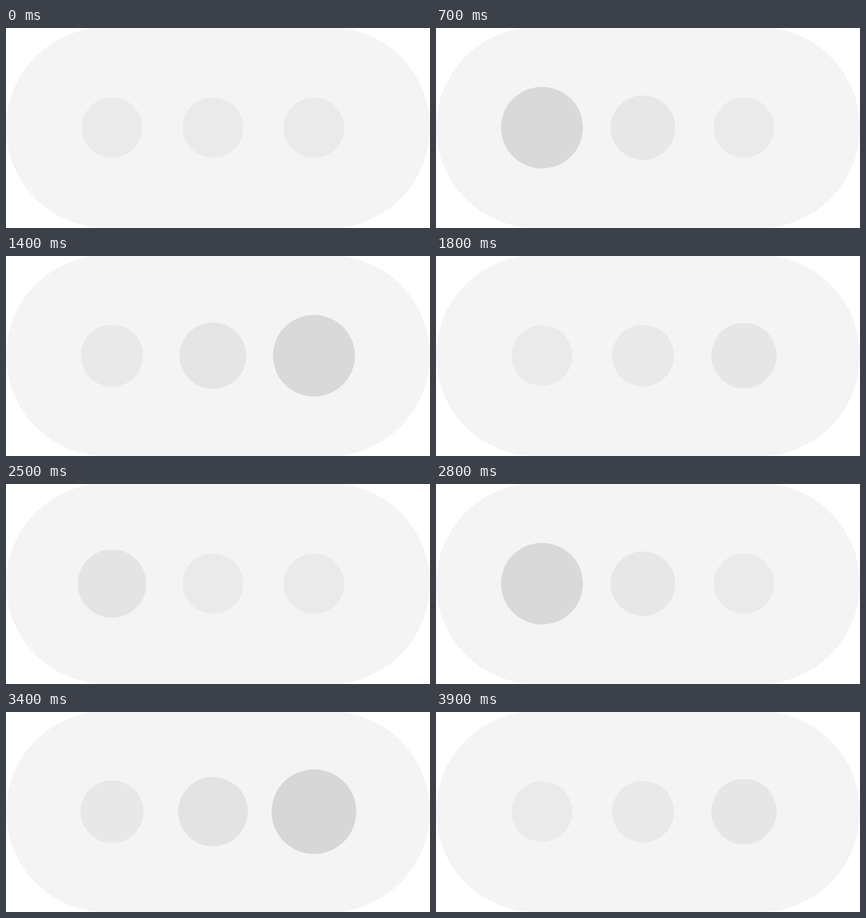
Recreate the animation shown at these times as an HTML page. Size 640 by 303 pixels, loop 4.2 s.

```html
<!DOCTYPE html>
<html lang="en">
<head>
<meta charset="utf-8">
<title>Typing indicator</title>
<style>
  html, body { margin: 0; width: 100%; height: 100%; overflow: hidden; background: #fff; }
  svg { display: block; width: 100%; height: 100%; }
</style>
</head>
<body>
<svg viewBox="0 0 640 303">
  <rect x="0" y="-1.4" width="640" height="304.8" rx="152.4" fill="#f4f4f4"/>
  <circle cx="160" cy="151"/>
  <circle cx="312.4" cy="151"/>
  <circle cx="464.8" cy="151"/>
</svg>
<script>
const CYCLE = 2100, STEP = 100;
const FIRST_PEAK = 600, LAGS = [0, 360, 700];
const REST = 45.7, GROW = 18.3;
const LIGHT = 234, DARKEN = 19;
const FLOOR = 0.045;

const dots = document.querySelectorAll("circle");

// Bell around its peak: steep swell before it, long settling tail after.
function pulse(x) {
  const bell = x < 0 ? 1 / (1 + (-x / 165) ** 3) : 1 / (1 + (x / 280) ** 2);
  return Math.max(0, (bell - FLOOR) / (1 - FLOOR));
}

function draw(ms) {
  const t = Math.floor((ms % CYCLE) / STEP) * STEP;
  dots.forEach((dot, i) => {
    const level = pulse(t - FIRST_PEAK - LAGS[i]);
    const grey = Math.round(LIGHT - DARKEN * level);
    dot.setAttribute("r", (REST + GROW * level).toFixed(2));
    dot.setAttribute("fill", `rgb(${grey},${grey},${grey})`);
  });
}

const start = performance.now();
function tick() {
  draw(performance.now() - start);
  requestAnimationFrame(tick);
}
tick();
</script>
</body>
</html>
```
